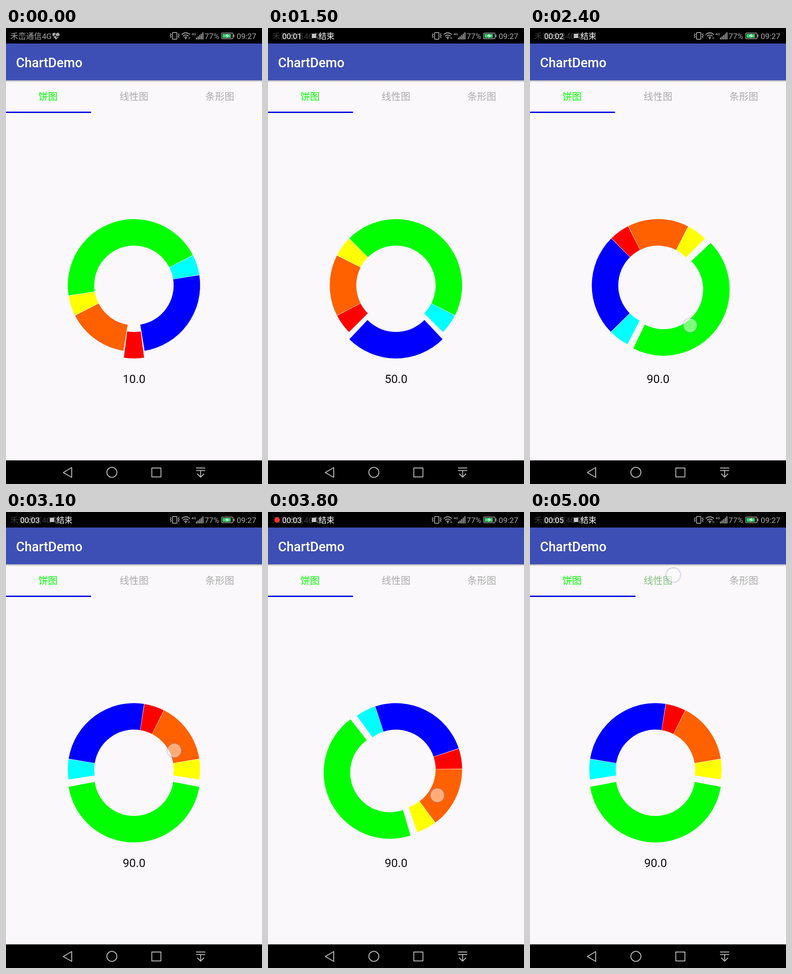
Recreate the animation shown at these times as an HTML page. Size 561 by 998 pixels, loop 5.1 s.

```html
<!DOCTYPE html>
<html lang="zh-CN">
<head>
<meta charset="utf-8">
<title>ChartDemo</title>
<style>
  html, body { margin: 0; width: 100%; height: 100%; overflow: hidden; background: #faf8fa; }
  svg { display: block; width: 561px; height: 998px; }
  text { font-family: Roboto, "Noto Sans CJK SC", "Noto Sans CJK", sans-serif; }
  .status { font-size: 17.3px; fill: #a8a8a8; }
  .rec { font-size: 17.3px; fill: #fff; }
  .tab { font-size: 21px; fill: #aaa; text-anchor: middle; }
  .line { fill: none; stroke: #b4b4b4; stroke-width: 2; stroke-linejoin: round; }
</style>
</head>
<body>
<svg viewBox="0 0 561 998">
  <defs>
    <linearGradient id="shade" x2="0" y2="1">
      <stop offset="0" stop-opacity=".3"/>
      <stop offset="1" stop-opacity="0"/>
    </linearGradient>
    <radialGradient id="glow">
      <stop offset="0" stop-color="#fff" stop-opacity=".46"/>
      <stop offset=".76" stop-color="#fff" stop-opacity=".5"/>
      <stop offset=".84" stop-color="#8a8ab8" stop-opacity=".34"/>
      <stop offset="1" stop-color="#8a8ab8" stop-opacity="0"/>
    </radialGradient>
  </defs>
  <rect width="561" height="998" fill="#faf8fa"/>

  <g id="page">
    <g id="ring"></g>
    <text id="label" x="280.7" y="776.7" font-size="25.7" text-anchor="middle" fill="#111"></text>
  </g>

  <rect y="114" width="561" height="5" fill="url(#shade)"/>
  <rect y="34" width="561" height="80.4" fill="#3d4fb4"/>
  <text x="22" y="85.5" font-size="28.6" font-weight="500" fill="#fff">ChartDemo</text>
  <text class="tab" x="92" y="156.5" style="fill:#00ff00">饼图</text>
  <text class="tab" id="tab2" x="280.5" y="156.5">线性图</text>
  <text class="tab" x="468.5" y="156.5">条形图</text>
  <rect id="bar" y="183" height="3" rx="1" fill="#0808e0"/>

  <rect width="561" height="34" fill="#000"/>
  <g id="carrier">
    <text class="status" x="9.5" y="24">禾峦通信4G</text>
    <path d="M109.5 25.5L103 18.5C99.5 14 103 9.5 106.5 10.5Q108.5 11 109.5 13Q110.5 11 112.5 10.5C116 9.5 119.5 14 116 18.5Z" fill="#a8a8a8"/>
    <path d="M101 18h5l2-3.5 3 6 2-2.5h5" fill="none" stroke="#000" stroke-width="1.3"/>
  </g>
  <g id="recorder">
    <circle id="dot" cx="20" cy="17.5" r="6" fill="#ff3322"/>
    <text class="rec" id="timer" x="31" y="24"></text>
    <rect x="96" y="12.5" width="9.5" height="9.5" fill="#c4c4c4"/>
    <text class="rec" x="111" y="24">结束</text>
  </g>

  <g class="line" style="stroke:#a8a8a8;stroke-width:1.7">
    <rect x="365" y="9.8" width="9.5" height="14.8" rx="1"/>
    <path d="M360 12l2 2-2 2.5 2 2.5-2 2.5M379.5 12l-2 2 2 2.5-2 2.5 2 2.5"/>
    <path d="M385 14.5Q394 6.5 403 14.5M388 18Q394 12.5 400 18M391 21Q394 18.5 397 21"/>
  </g>
  <circle cx="394" cy="23" r="1.6" fill="#a8a8a8"/>
  <path d="M400 20v4M402.5 20v4" stroke="#a8a8a8"/>
  <text x="406.5" y="16" font-size="8" font-weight="500" fill="#a8a8a8">4G</text>
  <path d="M417.5 25v-4M421 25v-6.5M424.5 25v-9.5M428 25v-12.5M431.5 25v-15.5" stroke="#a8a8a8" stroke-width="2.2"/>
  <text class="status" x="435" y="23.5">77%</text>
  <rect x="472.5" y="11" width="25" height="12.5" rx="2" fill="none" stroke="#a8a8a8" stroke-width="1.4"/>
  <rect x="474.5" y="13" width="18" height="8.5" fill="#2fd566"/>
  <rect x="498.5" y="14.5" width="2" height="5.5" fill="#a8a8a8"/>
  <path d="M486 12.5l-6 5h4l-1 4.5 6-5.5h-4z" fill="#fff"/>
  <text class="status" x="505.5" y="24">09:27</text>

  <rect y="946.3" width="561" height="51.7" fill="#000"/>
  <g class="line">
    <path d="M144 962V983.5L125.5 972.8Z"/>
    <circle cx="232" cy="972.5" r="11"/>
    <rect x="319.5" y="963" width="20" height="19.5"/>
    <path d="M416.5 963h20M416.5 968.5h20M426.5 968.5v14M419 975.5l7.5 7.5 7.5-7.5"/>
  </g>

  <circle id="touch" r="18.5" fill="url(#glow)"/>
</svg>

<script>
const LOOP = 5100, STEP = 100;
const CX = 280.4, CY = 563.3, R_OUT = 145, R_IN = 87;
const POP = 15, GAP = 0.2, FLARE = 0.8;
const slices = [
  [10, '#ff0000'], [30, '#ff6000'], [10, '#ffff00'],
  [90, '#00ff00'], [10, '#00ffff'], [50, '#0000ff']
];
const total = slices.reduce((sum, s) => sum + s[0], 0);

// [time, degrees, eased]: drags are linear, releases are eased
const spin = [
  [500, 0], [800, 24], [1250, 62], [1500, 54, 1], [1700, 54], [2400, 144.3],
  [2900, 198, 1], [3100, 198], [3800, 260.6], [4000, 268], [4500, 198, 1]
];
// one list of [time, x, y] per touch
const touches = [
  [[500, 369, 548], [800, 370, 586], [1250, 352, 655]],
  [[1700, 370, 495], [2000, 371, 566], [2400, 351, 651]],
  [[3100, 369, 522], [3800, 371, 620], [4000, 366, 634]],
  [[4800, 314, 138], [5100, 314, 138]]
];
const labels = [[0, '10.0'], [1300, '50.0'], [2400, '90.0']];

const $ = id => document.getElementById(id);
const rad = deg => deg * Math.PI / 180;
const mod = (a, n) => (a % n + n) % n;
const smooth = p => (1 - Math.cos(Math.PI * p)) / 2;

function at(track, t, k = 1) {
  const i = track.findIndex(p => p[0] > t);
  if (i === 0) return track[0][k];
  if (i < 0) return track[track.length - 1][k];
  const a = track[i - 1], b = track[i];
  const p = (t - a[0]) / (b[0] - a[0]);
  return a[k] + (b[k] - a[k]) * (k === 1 && b[2] === 1 ? smooth(p) : p);
}

// the chosen slice moves outwards and is a little wider at its inner edge
function sector(from, sweep, chosen) {
  const mid = rad(from + sweep / 2), to = from + sweep;
  const pop = chosen ? POP : 0, flare = chosen ? FLARE : -GAP;
  const x = CX + pop * Math.cos(mid), y = CY + pop * Math.sin(mid);
  const point = (r, deg) =>
    (x + r * Math.cos(rad(deg))).toFixed(2) + ' ' + (y + r * Math.sin(rad(deg))).toFixed(2);
  return `M${point(R_OUT, from + GAP)}A${R_OUT} ${R_OUT} 0 0 1 ${point(R_OUT, to - GAP)}` +
    `L${point(R_IN, to + flare)}A${R_IN} ${R_IN} 0 0 0 ${point(R_IN, from - flare)}Z`;
}

const paths = slices.map(([, color]) => {
  const path = document.createElementNS('http://www.w3.org/2000/svg', 'path');
  path.setAttribute('fill', color);
  return $('ring').appendChild(path);
});

function drawRing(turn) {
  let from = 81 + turn;
  slices.forEach(([value], i) => {
    const sweep = value / total * 360;
    const chosen = mod(90 - from, 360) < sweep;
    paths[i].setAttribute('d', sector(from, sweep, chosen));
    from += sweep;
  });
}

function drawRecorder(t) {
  const on = t >= 100;
  const beat = Math.max(0, t - 60) / 985;
  $('carrier').setAttribute('opacity', on ? 0.36 : 1);
  $('recorder').setAttribute('visibility', on ? 'visible' : 'hidden');
  $('dot').setAttribute('opacity', beat % 1 >= 0.5 ? 1 : 0);
  $('timer').textContent = '00:0' + Math.floor(beat);
}

function drawTouch(t) {
  const path = touches.find(p => t >= p[0][0] && t <= p[p.length - 1][0]);
  $('touch').setAttribute('opacity', path ? 1 : 0);
  if (!path) return;
  $('touch').setAttribute('cx', at(path, t, 1));
  $('touch').setAttribute('cy', at(path, t, 2));
}

function draw(t) {
  const sliding = t >= 5000;
  drawRing(at(spin, t));
  drawRecorder(t);
  drawTouch(t);
  $('label').textContent = labels.filter(l => l[0] <= t).pop()[1];
  $('page').setAttribute('transform', `translate(${sliding ? -5.5 : 0} 0)`);
  $('bar').setAttribute('width', sliding ? 231.5 : 186.5);
  $('tab2').style.fill = sliding ? '#7fc47f' : '#aaa';
}

const start = performance.now();
function tick() {
  const t = (performance.now() - start) % LOOP;
  draw(Math.floor(t / STEP) * STEP);
  requestAnimationFrame(tick);
}
tick();
</script>
</body>
</html>
```
